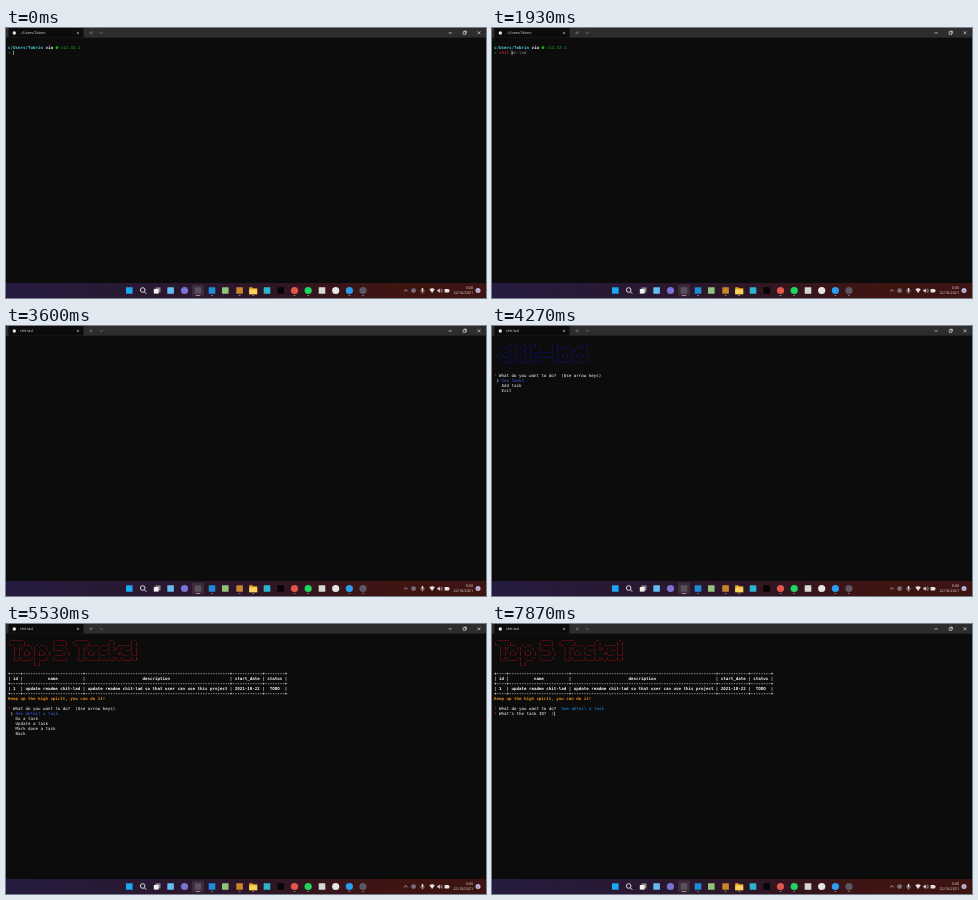
These frames come from a looping animation (480 px wide and 270 px high, 8000 ms). An HTML page:

```html
<!DOCTYPE html>
<html lang="en">
<head>
<meta charset="utf-8">
<title>Terminal task list</title>
<style>
  html, body { margin: 0; width: 100%; height: 100%; overflow: hidden; background: #0c0c0c; }
  svg { display: block; width: 100vw; height: 100vh; }
  text { white-space: pre; text-rendering: geometricPrecision; }
  #screen text { font: 4.152px "DejaVu Sans Mono", monospace; }
  #screen .b { font-weight: bold; }
  .ui { font-family: "Open Sans", "Noto Sans", sans-serif; font-size: 3.7px; fill: #e4e4e4; }
  .line { fill: none; stroke: #d8d8d8; stroke-width: .7; }
</style>
</head>
<body>
<svg viewBox="0 0 480 270" preserveAspectRatio="none">
  <defs>
    <linearGradient id="bar">
      <stop offset="0" stop-color="#251b3f"/>
      <stop offset=".5" stop-color="#2c1628"/>
      <stop offset=".8" stop-color="#3f1411"/>
      <stop offset="1" stop-color="#3c1412"/>
    </linearGradient>
  </defs>
  <rect width="480" height="270" fill="#0c0c0c"/>

  <g id="titlebar">
    <rect width="480" height="9.6" fill="#2d2d2d"/>
    <rect x="2.5" y="0" width="75" height="9.6" fill="#0c0c0c"/>
    <circle cx="8.3" cy="5" r="1.7" fill="#eee6d0"/>
    <text id="tab" class="ui" x="14" y="6.2"></text>
    <path class="line" style="stroke-width:.5" d="M70.8 3.8l2.2 2.2m0-2.2l-2.2 2.2"/>
    <path class="line" style="stroke:#777" d="M83.4 4.8h3.4m-1.7-1.7v3.4M93.6 4.2l1.7 1.3 1.7-1.3"/>
    <path class="line" d="M442.6 4.9h3.2M457.2 3.7h2.6v2.6h-2.6zM458.1 3.1h2.3v2.3M471.6 3.4l2.8 2.8m0-2.8l-2.8 2.8"/>
  </g>

  <g id="screen"></g>

  <g id="taskbar">
    <rect y="255" width="480" height="15" fill="url(#bar)"/>
    <rect x="186" y="256.4" width="12" height="12" rx="1.4" fill="#3d2b3c"/>
    <g id="icons"></g>
    <circle class="line" style="stroke-width:1" cx="136.7" cy="262" r="2.3"/>
    <path class="line" style="stroke-width:1" d="M138.4 263.7l1.9 2.1"/>
    <rect x="149.5" y="259.4" width="5" height="5" fill="#8d8791"/>
    <rect x="147.8" y="261" width="4.8" height="4.6" fill="#f0f0f0"/>
    <path d="M243.2 259.2h3l1 1h4v6h-8z" fill="#e0a526"/>
    <path d="M243.2 261.4h8v4.8h-8z" fill="#fbd35c"/>

    <path class="line" d="M398.2 263.4l1.8-1.8 1.8 1.8"/>
    <circle cx="407.6" cy="262.6" r="2.4" fill="#77717c"/>
    <rect x="415.6" y="260" width="1.8" height="3.4" rx=".9" fill="#e4e4e4"/>
    <path class="line" style="stroke-width:.5" d="M414.7 262.3q0 2.1 1.8 2.1t1.8-2.1M416.5 264.4v1.2"/>
    <path d="M423.4 261.3q2.7-2.3 5.4 0l-2.7 3.6z" fill="#e4e4e4"/>
    <path d="M431.4 261.8h1l1.4-1.4v4.6l-1.4-1.4h-1z" fill="#e4e4e4"/>
    <path class="line" style="stroke-width:.5" d="M434.7 261.4q.9 1.3 0 2.6m.9-3.3q1.4 2 0 4"/>
    <path d="M438.6 261h4.2v3.4h-4.2zM442.8 262h.8v1.4h-.8z" fill="#e4e4e4"/>
    <text class="ui" x="467" y="261.2" text-anchor="end">0:00</text>
    <text class="ui" x="467" y="266.4" text-anchor="end">22/10/2021</text>
    <circle cx="472" cy="262.6" r="2.5" fill="#c3b5dc"/>
    <text class="ui" x="472" y="263.8" text-anchor="middle" style="font-size:3.2px;fill:#222">1</text>
  </g>
</svg>

<script>
const LOOP = 8000, CELL = 2.5, ROW = 5, LEFT = 2, TOP = 15, BASELINE = .8;
const APP = "chit-lad", USER = "Tobrin";
const WHITE = "#f2f2f2", GREEN = "#16b010", RED = "#d8404a", GREY = "#8a8a8a",
      BLUE = "#4258e4", SKY = "#1f93f0", ORANGE = "#e58a1c";

const LOGO = String.raw`
      _     _ _        _           _
  ___| |__ (_) |_     | | __ _  __| |
 / __| '_ \| | __|____| |/ _~ |/ _~ |
| (__| | | | | ||_____| | (_| | (_| |
 \___|_| |_|_|\__|    |_|\__,_|\__,_|`;

const TOP_TASKS = String.raw`
 _____             ____    _____         _        _
|_   _|__  _ __   | ___|  |_   _|_ _ ___| | _____| |
  | |/ _ \| '_ \  |___ \    | |/ _~ / __| |/ / __| |
  | | (_) | |_) |  ___) |   | | (_| \__ \   <\__ \_|
  |_|\___/| .__/  |____/    |_|\__,_|___/_|\_\___(_)
          |_|`;

const $ = id => document.getElementById(id);
const esc = s => s.replace(/&/g, "&amp;").replace(/</g, "&lt;");
const px = col => LEFT + col * CELL;

// Last entry of [time, value] pairs that has begun at t.
const at = (t, steps) => steps.reduce((v, s) => t >= s[0] ? s[1] : v, null);

function put(row, col, str, fill, bold) {
  return `<text x="${px(col)}" y="${TOP + row * ROW + BASELINE}" fill="${fill}"${bold ? ' class="b"' : ""}>${esc(str)}</text>`;
}

const caret = (row, col) =>
  `<rect x="${px(col) + .2}" y="${TOP + row * ROW - 2.4}" width=".6" height="4.4" fill="#d8d8d8"/>`;

const banner = (art, col, fill) => art.slice(1).replace(/~/g, "`").split("\n")
  .map((line, i) => put(i, col, line, fill, true)).join("");

const ask = (row, question) => put(row, 0, "?", "#c0202c") + put(row, 2, question, "#fff");

function menu(row, items, picked) {
  return ask(row, "What do you want to do?  (Use arrow keys)") + items.map((item, i) =>
    (i === picked ? put(row + 1 + i, 1, "❯", "#cdd3f5") : "") +
    put(row + 1 + i, 3, item, i === picked ? BLUE : WHITE)).join("");
}

function table(row) {
  const widths = [4, 24, 58, 12, 8];
  const job = "update readme " + APP;
  const center = (s, w) => s.padStart(s.length + Math.floor((w - s.length) / 2)).padEnd(w);
  const cells = list => "|" + list.map((s, i) => center(s, widths[i])).join("|") + "|";
  const rule = "+" + widths.map(w => "-".repeat(w)).join("+") + "+";
  return [
    rule,
    cells(["id", "name", "description", "start_date", "status"]),
    rule,
    cells(["1", job, job + " so that user can use this project", "2021-10-22", "TODO"]),
    rule
  ].map((line, i) => put(row + i, 0, line, WHITE, true)).join("");
}

function shell(t) {
  const [typed, hint] = at(t, [
    [0, ["", ""]],
    [600, ["c", "at notes"]],
    [730, ["ch", "mod a.x"]],
    [870, ["chi", "t-en-lad"]],
    [1000, ["chit", "-en-lad"]],
    [1930, ["chit-", "en-lad"]],
    [2130, ["chit-l", "ad"]],
    [2270, [APP, ""]]
  ]);
  const sent = t >= 2930;
  return put(1, 0, "c/Users/" + USER, "#55cfd8", true) +
    put(1, 15, "via", WHITE, true) +
    `<circle cx="${px(19.6)}" cy="19.7" r="1.4" fill="${GREEN}"/>` +
    put(1, 21, "v12.32.1", GREEN) +
    put(2, 0, "→", GREEN, true) +
    put(2, 2, typed, typed === APP ? GREEN : RED) +
    put(2, 2 + typed.length, hint, GREY) +
    (sent ? caret(3, 0) : caret(2, 2 + typed.length));
}

function mainMenu(t) {
  if (t < 3670) return "";
  const picked = at(t, [[0, 0], [4870, 1], [5000, 2], [5070, 1], [5270, 0]]);
  return banner(LOGO, 1, "#1616b4") +
    (t < 3800 ? "" : menu(7, ["See tasks", "Add task", "Exit"], picked));
}

function taskList(t) {
  const head = banner(TOP_TASKS, 0, "#c81414") + table(7) +
    put(12, 0, "Keep up the high spirit, you can do it!", ORANGE, true);
  const items = ["See detail a task", "Do a task", "Update a task", "Mark done a task", "Back"];
  if (t < 7330) return head + menu(14, items, at(t, [[0, 0], [6870, 1], [7130, 0]]));
  const id = t >= 7870 ? "1" : "";
  return head + ask(14, "What do you want to do?") + put(14, 27, items[0], SKY) +
    (t < 7400 ? "" : ask(15, "What's the task ID?") + put(15, 23, id, GREY) + caret(15, 23 + id.length));
}

function drawIcons() {
  // x, colour, round, running
  const apps = [
    [123.3, "#1aa8f0"], [164.6, "#63bdf0"], [178.5, "#7774d6", 1],
    [192, "#57525c", 0, 1], [206, "#1f8ad6", 0, 1], [219.3, "#8fc47a"],
    [233.6, "#c9852c", 0, 1], [261, "#2bb5d0"], [274.7, "#050505"],
    [288.5, "#e2574a", 1, 1], [302.2, "#1ed760", 1, 1], [316, "#d8d8d8"],
    [329.7, "#e6e6e6", 1], [343.4, "#2a9df0", 1, 1], [357, "#5c5862", 1, 1]
  ];
  const dash = (x, w, fill) =>
    `<rect x="${x - w / 2}" y="267.2" width="${w}" height=".9" rx=".4" fill="${fill}"/>`;
  $("icons").innerHTML = apps.map(([x, fill, round, running]) =>
    (round ? `<circle cx="${x}" cy="262.5" r="3.6" fill="${fill}"/>`
           : `<rect x="${x - 3.3}" y="259.2" width="6.6" height="6.6" rx=".5" fill="${fill}"/>`) +
    (running ? dash(x, x === 192 ? 4.4 : 2, x === 192 ? "#d99ac0" : "#9a929c") : "")
  ).join("") + dash(247.2, 2, "#9a929c");
}

let shown = "";
function render(t) {
  const view = t < 3600 ? shell(t) : t < 5530 ? mainMenu(t) : taskList(t);
  const title = t < 2930 ? "../Users/" + USER : APP;
  if (view + title === shown) return;
  shown = view + title;
  $("screen").innerHTML = view;
  $("tab").textContent = title;
}

const start = performance.now();
function tick() {
  render((performance.now() - start) % LOOP);
  requestAnimationFrame(tick);
}
drawIcons();
tick();
</script>
</body>
</html>
```
